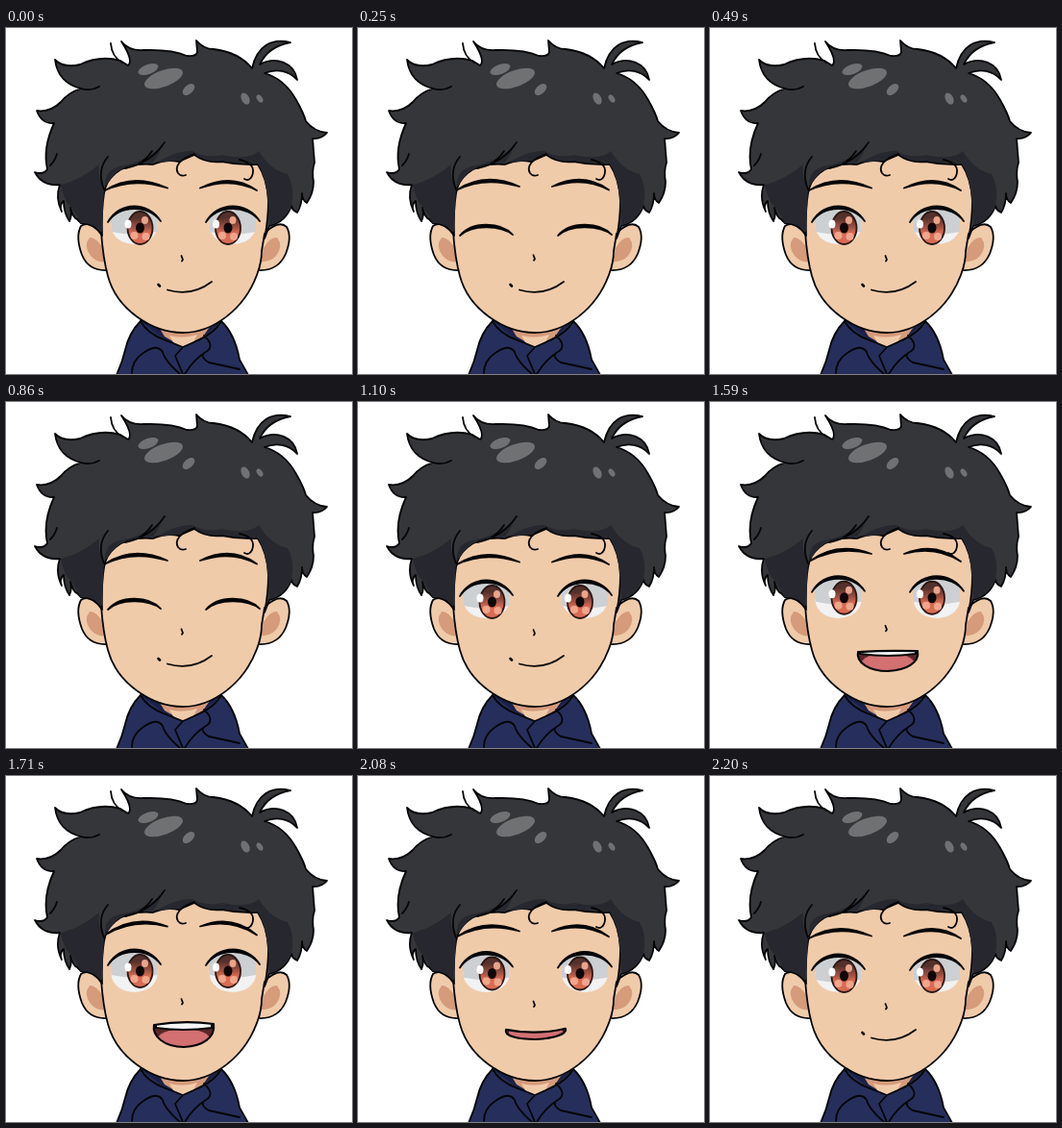
Animation, 360 px wide and 360 px high, one loop 2450 ms. Source, as an HTML page:

```html
<!DOCTYPE html>
<html lang="en">
<head>
<meta charset="utf-8">
<title>Blink and talk</title>
<style>
html, body { margin: 0; width: 100%; height: 100%; overflow: hidden; background: #fff; }
svg { display: block; width: 100vw; height: 100vh; }
.line, .ink { stroke: #050507; stroke-width: 1.8; stroke-linecap: round; stroke-linejoin: round; }
.line { fill: none; }
.black { fill: #050507; }
.skin { fill: #f0cbaa; }
.tan { fill: #d59b7b; }
.hair { fill: #353639; }
.shade { fill: #27282f; }
.shine { fill: #707172; }
.navy { fill: #262f5c; }
.deep { fill: #1b2147; }
</style>
</head>
<body>
<svg viewBox="0 0 360 360" xmlns="http://www.w3.org/2000/svg">
  <defs>
    <clipPath id="eyeClip0"><path id="eyeShape0"/></clipPath>
    <clipPath id="eyeClip1"><path id="eyeShape1"/></clipPath>
    <clipPath id="mouthClip"><path id="mouthShape"/></clipPath>
    <linearGradient id="irisFill" x1="0" y1="0" x2="0" y2="1">
      <stop offset=".2" stop-color="#54302b"/>
      <stop offset=".5" stop-color="#a95343"/>
      <stop offset=".65" stop-color="#d96c53"/>
    </linearGradient>
  </defs>

  <!-- neck and shirt -->
  <path class="navy ink" d="M115 361Q121 348 124 335Q128 317 140 305H224Q238 318 243 345L252 361Z"/>
  <path class="deep" d="M140 305H224L202 325L184 332L166 325Z"/>
  <path class="tan" d="M157 308H214L205 321L184 332L165 321Z"/>
  <path class="skin" d="M170 320Q184 324 199 319L195 327L184 332L174 327Z"/>
  <path class="line" d="M140 305Q147 318 166 325L184 332L202 324Q218 316 224 305M131 359Q131 346 143 338Q157 328 163 337Q165 346 181 360M184 332L176 341L184 360M206 320Q218 331 208 337Q200 341 211 348L243 355M208 337Q195 345 186 360"/>

  <!-- ears -->
  <path class="skin ink" d="M103 214Q86 200 78 206Q72 217 79 236Q86 253 105 252Z"/>
  <path class="skin ink" d="M268 214Q284 199 292 207Q298 217 291 235Q283 253 263 252Z"/>
  <path class="tan" d="M87 218Q80 227 88 237Q95 245 104 243L101 229Q93 217 87 218Z"/>
  <path class="tan" d="M282 218Q289 227 281 237Q275 244 263 243L268 229Q275 217 282 218Z"/>

  <!-- face -->
  <path class="skin" d="M99 218V150L150 115H255L272 160V200L266 232Q266 244 261 257C248 292 216 317 184 317C151 317 115 292 106 258Q101 238 99 218Z"/>
  <path class="line" d="M99 212Q101 240 106 258C115 292 151 317 184 317C216 317 248 292 261 257Q266 244 266 232L269 214"/>

  <g id="features"></g>

  <!-- hair -->
  <path class="hair ink" d="M32 86Q46 88 57 77Q65 67 78 63Q54 57 51 33Q60 42 77 38Q98 28 119 34L127 39Q133 34 120 14Q128 24 143 23Q173 22 188 29Q198 30 199 25L198 13Q206 22 216 22Q242 25 256 42C261 19 276 10 296 15C280 18 269 27 264 38C281 29 300 36 303 54C294 44 281 42 269 47Q290 53 302 75Q310 89 312 97Q321 108 334 109Q328 116 319 115L321 140Q318 149 320 160Q320 172 313 182Q308 179 308 172Q308 184 303 192Q298 190 297 185Q291 202 274 206L269 219Q273 198 273 180Q272 157 262 142Q243 143 225 139Q208 141 196 132L180 139Q166 136 153 142Q128 140 114 151Q104 159 102 172Q99 191 100 216Q92 203 78 203L74 199Q70 198 67 187Q69 195 66 201Q60 192 60 180Q55 184 58 191Q51 177 56 163Q38 165 30 150Q39 153 43 147Q38 125 50 99Q37 100 32 86Z"/>
  <path class="line" d="M109 16Q110 30 121 36"/>
  <path class="shade" d="M57 163Q76 159 97 142Q95 156 102 166L100 212Q92 203 78 203L69 188Q60 180 57 163Z"/>
  <path class="shade" d="M103 165Q102 145 124 143Q152 136 164 120Q159 132 153 140Q128 140 114 151Z"/>
  <path class="shade" d="M157 140Q177 127 194 128Q208 136 225 132Q252 138 263 128Q275 148 293 152Q301 166 297 185Q290 201 274 205Q273 158 262 141Q243 142 225 138Q208 140 196 131L180 138Z"/>
  <path class="line" d="M78 63Q88 66 97 61M53 131Q51 138 46 143M106 134Q94 148 102 168M124 146Q150 141 165 119M137 142Q146 137 152 128M196 131C181 136 175 144 179 151Q182 155 187 153M243 137Q261 141 256 154Q253 160 248 157"/>
  <g class="shine">
    <ellipse cx="164" cy="52.500" rx="21" ry="8.500" transform="rotate(-20 164 52.500)"/>
    <ellipse cx="148" cy="43" rx="11" ry="5" transform="rotate(-20 148 43)"/>
    <ellipse cx="190" cy="64" rx="7.500" ry="4.500" transform="rotate(-42 190 64)"/>
    <ellipse cx="249" cy="73.500" rx="4" ry="6.500" transform="rotate(-28 249 73.500)"/>
    <ellipse cx="264" cy="73.500" rx="2.800" ry="4.500" transform="rotate(-35 264 73.500)"/>
  </g>
</svg>
<script>
const LOOP = 2450;
const features = document.getElementById('features');
const byId = id => document.getElementById(id);

// lift raises brows, eyes and nose; lid: 0 open to 1 closed; mouth: 0 smile to 1 open
const POSES = {
  rest:   { lift: 0, lid: 0, mouth: 0 },
  shut:   { lift: 1.5, lid: 1, mouth: 0 },
  settle: { lift: .5, lid: 1, mouth: 0 },
  speak:  { lift: 5, lid: 0, mouth: .2 },
  wider:  { lift: 8.5, lid: 0, mouth: .8 },
  wide:   { lift: 10, lid: 0, mouth: 1 }
};
const SCHEDULE = [
  [0, 'rest'], [250, 'shut'], [370, 'settle'], [490, 'rest'],
  [860, 'shut'], [980, 'settle'], [1100, 'rest'],
  [1470, 'speak'], [1590, 'wider'], [1710, 'wide'],
  [2080, 'speak'], [2200, 'rest']
];
const EYES = [
  { left: 106, right: 161, iris: 139.5, browOuter: 103, browInner: 168 },
  { left: 208, right: 264, iris: 231, browOuter: 261, browInner: 202 }
];

const mix = (a, b, t) => a + (b - a) * t;
const path = (d, attrs) => `<path d="${d}" ${attrs}/>`;
const oval = (x, y, rx, ry, fill, more = '') =>
  `<ellipse cx="${x}" cy="${y}" rx="${rx}" ry="${ry}" fill="${fill}" ${more}/>`;

function brow({ browOuter, browInner }, lift) {
  const mid = mix(browOuter, browInner, .45);
  const outer = 169 - lift * .35, inner = 166.5 - lift, crest = 150 - lift * .7;
  return path(`M${browOuter} ${outer}Q${mid} ${crest} ${browInner} ${inner}` +
    `Q${mid} ${crest + 5} ${browOuter} ${outer}Z`, 'class="ink black"');
}

function eye(index, { lift, lid }) {
  const { left, right, iris } = EYES[index];
  const rise = lid ? 0 : lift / 2;
  const low = mix(202, 216, lid) - rise, high = mix(180, 201, lid) - rise;
  const a = left + 12, b = right - 13;
  const arch = `M${left} ${low}C${a} ${high} ${b} ${high} ${right} ${low - 1}`;
  const lidLine = path(`${arch}C${b} ${high + 3.500} ${a} ${high + 3.500} ${left} ${low}Z`, 'class="ink black"');
  if (lid === 1) return lidLine;

  const mid = (left + right) / 2, y = 208 - rise;
  byId('eyeShape' + index).setAttribute('d',
    `${arch}C${right - 2} 220 ${mid + 12} 226 ${mid} 226C${mid - 14} 226 ${left + 4} 219 ${left} ${low}Z`);
  return `<g clip-path="url(#eyeClip${index})">` +
    oval(mid, 206, 24, 19, '#f1f2f2') +
    path(`M${mid - 24} 180H${mid + 24}V${y + 4}Q${mid} ${y + 9} ${mid - 24} ${y + 4}Z`, 'fill="#ccd0d2"') + '</g>' +
    oval(iris, y, 13, 17, 'url(#irisFill)', 'stroke="#2a1715" stroke-width="1.8"') +
    oval(iris + 5, y - 8, 3.5, 4, '#e9a58c') +
    oval(iris - 6, y + 8, 4, 4, '#f0a58c') + oval(iris + 6, y + 9, 4, 4, '#f0a58c') +
    oval(iris, y, 4.5, 5.5, '#0d0809') +
    oval(iris - 12.5, y - 4, 3.5, 4.5, '#fff') +
    lidLine;
}

function nose(lift) {
  const y = 237 - lift / 2;
  return path(`M182.500 ${y}L184 ${y + 4}L183 ${y + 5.500}`, 'class="line"');
}

function mouth(open) {
  if (!open) {
    return path('M168 272.500Q193 280 214 264', 'class="line"') +
      path('M158.500 267L160 268.500', 'class="line" style="stroke-width:2.6"');
  }
  const left = mix(265, 259, open), right = mix(264, 258, open);
  const dip = mix(274, 254, open), depth = mix(271, 281, open);
  const d = `M154 ${left}Q185 ${dip} 216 ${right}` +
    `C218 ${mix(267, 272, open)} 205 ${depth} 185 ${depth + 1}` +
    `C165 ${depth + 1} 152 ${mix(270, 271, open)} 154 ${left}Z`;
  byId('mouthShape').setAttribute('d', d);
  const teeth = open > .5
    ? path('M156 250H214V262Q185 266 156 262Z', 'fill="#f6f6f6" stroke="#050507" stroke-width="2"')
    : '';
  return path(d, 'fill="#5c2729"') +
    `<g clip-path="url(#mouthClip)">${oval(185, depth - 6, 28, 12, '#d37072')}${teeth}</g>` +
    path(d, 'class="line" style="stroke-width:2.2"');
}

function draw(ms) {
  const name = SCHEDULE.filter(([start]) => start <= ms).pop()[1];
  if (name === draw.shown) return;
  draw.shown = name;
  const pose = POSES[name];
  features.innerHTML = EYES.map((side, i) => eye(i, pose) + brow(side, pose.lift)).join('') +
    nose(pose.lift) + mouth(pose.mouth);
}

const began = performance.now();
function tick() {
  draw((performance.now() - began) % LOOP);
  requestAnimationFrame(tick);
}
tick();
</script>
</body>
</html>
```
